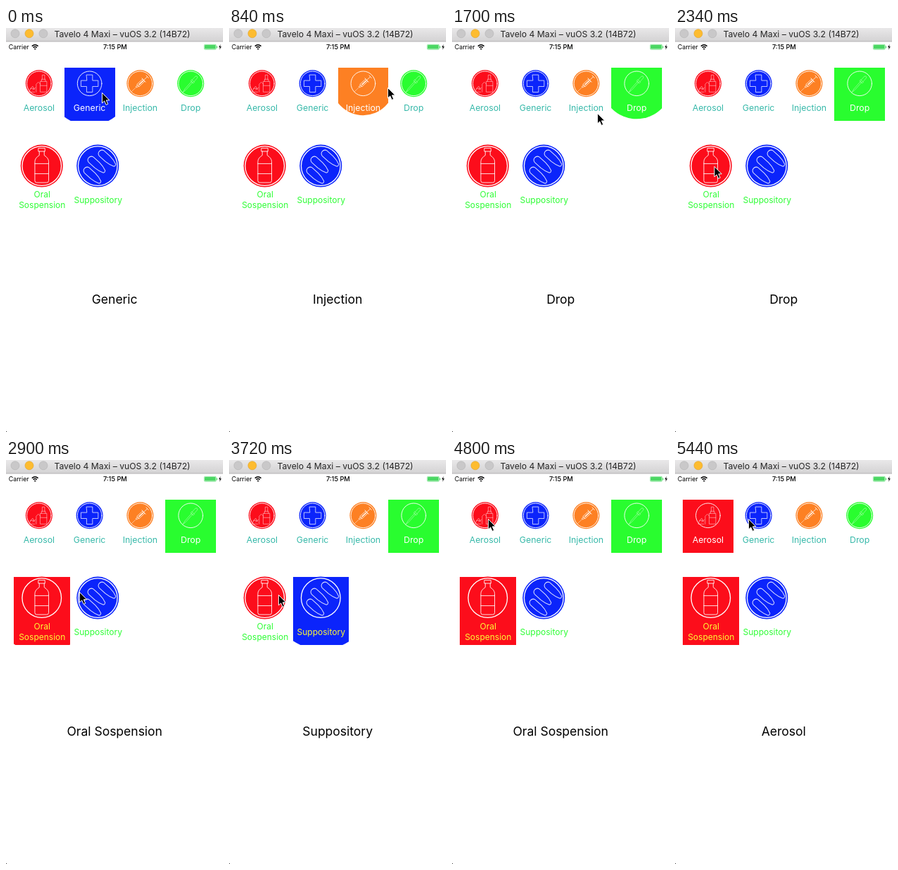
Animation of 308x570 px, one loop 5460 ms. Source, as an HTML page:

```html
<!DOCTYPE html>
<html lang="en">
<head>
<meta charset="utf-8">
<title>Medicine picker</title>
<style>
  html, body { margin: 0; width: 100%; height: 100%; overflow: hidden; background: #fff; }
  svg { display: block; width: 308px; height: 570px; font-family: Inter, Roboto, sans-serif; }
  text { text-anchor: middle; }
  .art { fill: none; stroke: #fff; stroke-linejoin: round; stroke-linecap: round; }
</style>
</head>
<body>
<svg id="stage" viewBox="0 0 308 570">
  <defs>
    <linearGradient id="bar" x2="0" y2="1">
      <stop stop-color="#e9e8e9"/><stop offset="1" stop-color="#d3d2d3"/>
    </linearGradient>
  </defs>
  <rect width="308" height="570" fill="#fff"/>
  <rect width="308" height="19" fill="url(#bar)"/>
  <rect y="18.5" width="308" height="1" fill="#b5b4b5"/>
  <g stroke-width=".6">
    <circle cx="13" cy="7.8" r="6" fill="#c9c8c9" stroke="#b3b2b3"/>
    <circle cx="33" cy="7.8" r="6" fill="#fdbc30" stroke="#dfa023"/>
    <circle cx="53" cy="7.8" r="6" fill="#c9c8c9" stroke="#b3b2b3"/>
  </g>
  <text x="165" y="12.5" font-size="12.2" fill="#262626">Tavelo 4 Maxi – vuOS 3.2 (14B72)</text>

  <text x="18.2" y="30" font-size="8.9">Carrier</text>
  <g fill="none" stroke="#000" stroke-width="1.5">
    <path d="M36.8 25.6Q41.2 21.8 45.6 25.6M38.6 27.6Q41.2 25.4 43.8 27.6"/>
    <path d="M40 29.2L41.2 30.4L42.4 29.2Z" fill="#000" stroke-width=".6"/>
  </g>
  <text x="154.8" y="30" font-size="9.2" font-weight="500">7:15 PM</text>
  <rect x="281.3" y="23.3" width="17" height="7" rx="1.4" fill="none" stroke="#4bd763" stroke-width=".6"/>
  <rect x="282" y="24" width="15.6" height="5.6" rx=".8" fill="#4bd763"/>
  <rect x="299" y="25.4" width="1" height="2.8" rx=".5" fill="#4bd763"/>
  <path d="M304.6 23L302 27.3H303.8L303 30.8L305.8 26.2H304Z"/>

  <g id="cells"></g>
  <text id="choice" x="154.2" y="388.7" font-size="17.5"></text>
  <rect y="569" width="1" height="1" fill="#333"/>
  <path id="cursor" d="m-.6 .4v14.6l3.3-3.1 2.4 5.5 2.6-1.1-2.4-5.4h4.5z" stroke="#fff" stroke-width="1"/>
</svg>
<script>
const LOOP = 5460, STEP = 20, GROW = 420;
const RED = '#fc0d1b', BLUE = '#0b24fb', ORANGE = '#fd8023', GREEN = '#29fd2f';

const rows = [
  { y: 56, w: 71.75, h: 75, cy: 78.3, r: 19, ring: 17.3, line: .9, from: 18, to: 66, shift: 0,
    size: 12.3, idle: '#38b9aa', on: '#fff', taps: [[-360, 1], [605, 2], [1420, 3], [5020, 0]] },
  { y: 165, w: 79.5, h: 96, cy: 194.6, r: 30, ring: 27.8, line: 1.3, from: 30, to: 79, shift: 1,
    size: 12, idle: '#2ffd36', on: '#fdf935', taps: [[2500, 0], [3353, 1], [4200, 0]] }
];

// Icon art is drawn around the centre of its disc.
const pill = (x, y) =>
  `<path transform="translate(${x} ${y}) rotate(42)" d="M3 -5H15Q23 -4.5 28.5 -2Q30 0 28.5 2Q23 4.5 15 5H3Q-1 4 -1 0Q-1 -4 3 -5Z"/>`;
const art = {
  Aerosol: `<path opacity=".65" stroke-width=".7" d="M2 -3H11V12H2ZM2 3H11M3.5 -3V-6H9V-3M4.5 -6V-12H8V-6
    M-4 12V1L-1 -2L2 1M-6 12H-14L-12 7H-8L-6 9M-12 7L-9 4L-7 7M-9 9L-5 6"/>`,
  Generic: `<path opacity=".8" stroke-width=".9"
    d="M-4.2 -12.2H4.2V-4.2H12.2V4.2H4.2V12.2H-4.2V4.2H-12.2V-4.2H-4.2Z"/>`,
  Injection: `<g transform="rotate(-43)" stroke-width=".7"><path opacity=".6" d="M-17 0H-7"/>
    <path d="M-7 -1H-4V1H-7ZM-4 -2.2H7V2.2H-4ZM7 0H14M14 -2.5V2.5M7 -3.8V3.8"/>
    <path d="M-2 0H6" stroke-width="1.4"/></g>`,
  Drop: `<g transform="rotate(-48)" opacity=".5" stroke-width=".7"><path d="M-16 0L-11 -1H3V1H-11ZM3 -2.5H5V2.5H3Z
    M5 -1.8H12Q15 0 12 1.8H5"/></g>`,
  'Oral Sospension': `<path opacity=".85" d="M-4.5 -25H4.5V-20.5H-4.5ZM-3.5 -20.5V-15Q-9.8 -11 -9.8 -6V21Q-9.8 23.5 -7 23.5H7
    Q9.8 23.5 9.8 21V-6Q9.8 -11 3.5 -15V-20.5M-9.8 -3.2H9.8M-9.8 11H9.8"/>`,
  Suppository: `<g opacity=".85">${pill(3, -20)}${pill(-12, -11)}${pill(-18, 4)}</g>`
};
const items = [
  ['Aerosol', RED, 0], ['Generic', BLUE, 0], ['Injection', ORANGE, 0], ['Drop', GREEN, 0],
  ['Oral Sospension', RED, 1], ['Suppository', BLUE, 1]
];

const byId = id => document.getElementById(id);

function cellMarkup([name, color, rowIndex], i) {
  const row = rows[rowIndex], col = i - rowIndex * 4;
  const x = 11 + col * row.w, cx = x + row.w / 2;
  const left = Math.round(x), right = Math.round(x + row.w);
  const words = name.split(' ');
  const base = rowIndex ? (words.length > 1 ? 239 : 246.7) : 117;
  const lines = words.map((word, n) =>
    `<tspan x="${cx + row.shift / 2}" y="${base + n * 15}">${word}</tspan>`).join('');
  return `<clipPath id="clip${i}"><rect x="${left}" y="${row.y}" width="${right - left}" height="${row.h}"/></clipPath>
    <g clip-path="url(#clip${i})"><circle id="fill${i}" cx="${cx + row.shift}" cy="${row.cy}" fill="${color}"/></g>
    <g transform="translate(${cx} ${row.cy})">
      <circle r="${row.r}" fill="${color}"/>
      <g class="art"><circle r="${row.ring}" stroke-width="${row.line}"/>${art[name]}</g>
    </g>
    <text id="label${i}" font-size="${row.size}">${lines}</text>`;
}
byId('cells').innerHTML = items.map(cellMarkup).join('');

// Pointer path: time, x, y. Repeated places are pauses for a tap.
const path = [
  [0, 137, 91], [480, 188, 88], [660, 190, 87], [840, 226, 84], [1220, 262, 84], [1480, 260, 87],
  [1700, 207, 120], [2300, 57, 195], [2580, 55, 195], [2900, 105, 186], [3180, 133, 192],
  [3420, 132, 193], [3720, 71, 190], [4020, 50, 194], [4300, 50, 194], [4800, 52, 83],
  [5090, 52, 83], [5440, 105, 83], [5460, 107, 83]
];

// Monotone cubic through the path points.
function along(t, axis) {
  const slope = i => path[i + 1] && path[i]
    ? (path[i + 1][axis] - path[i][axis]) / (path[i + 1][0] - path[i][0]) : null;
  const tangent = i => {
    const a = slope(i - 1), b = slope(i);
    if (a === null) return b;
    if (b === null) return a;
    return a * b > 0 ? 2 * a * b / (a + b) : 0;
  };
  let i = 0;
  while (i < path.length - 2 && t >= path[i + 1][0]) i++;
  const span = path[i + 1][0] - path[i][0], u = (t - path[i][0]) / span, v = 1 - u;
  return v * v * (1 + 2 * u) * path[i][axis] + u * u * (3 - 2 * u) * path[i + 1][axis]
    + span * u * v * (v * tangent(i) - u * tangent(i + 1));
}

function render(t) {
  let latest = [-Infinity];
  rows.forEach((row, r) => {
    const tap = row.taps.filter(([at]) => at <= t).pop();
    if (tap && tap[0] > latest[0]) latest = [tap[0], tap[1] + r * 4];
    items.forEach((item, i) => {
      if (item[2] !== r) return;
      const on = !!tap && tap[1] === i - r * 4;
      const p = on ? Math.min(1, (t - tap[0]) / GROW) : 0;
      byId('fill' + i).setAttribute('r', on ? row.from + (row.to - row.from) * p : 0);
      byId('label' + i).setAttribute('fill', on ? row.on : row.idle);
    });
  });
  byId('choice').textContent = items[latest[1]][0];
  byId('cursor').setAttribute('transform', `translate(${along(t, 1)} ${along(t, 2)})`);
}

const start = performance.now();
function tick() {
  const t = (performance.now() - start) % LOOP;
  render(Math.floor(t / STEP) * STEP);
  requestAnimationFrame(tick);
}
tick();
</script>
</body>
</html>
```
